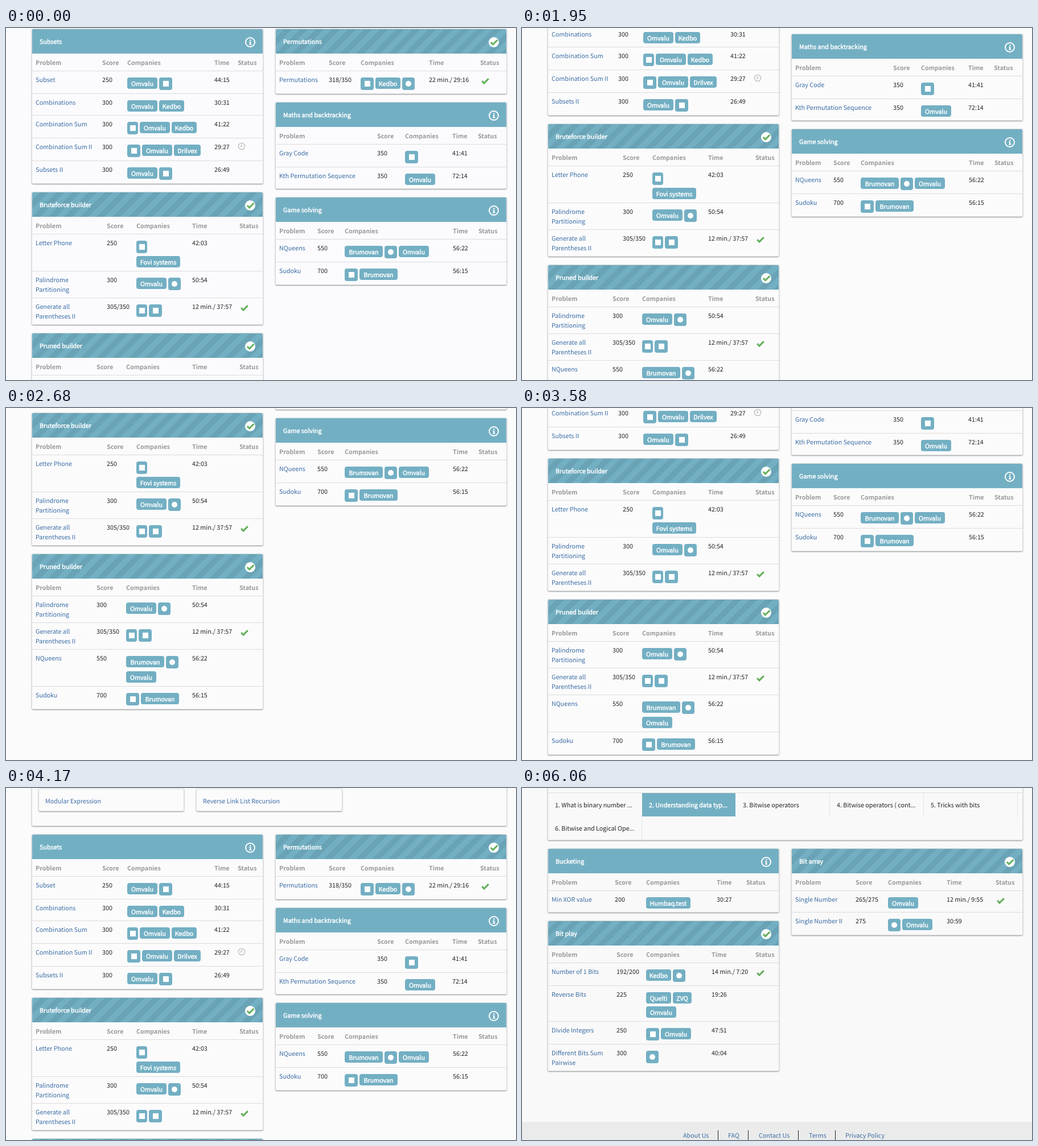
An HTML page that plays this animation: 896x619 px, repeating every 8 s.

```html
<!DOCTYPE html>
<html lang="en">
<head>
<meta charset="utf-8">
<title>Practice problems</title>
<style>
html, body { margin: 0; width: 100%; height: 100%; overflow: hidden; }
body {
  position: relative;
  font: 10.74px/17px "Noto Sans CJK JP", "Noto Sans CJK SC", "Noto Sans CJK KR", "Noto Sans CJK TC", "Open Sans", sans-serif;
  text-rendering: geometricPrecision;
  color: #222;
  animation: tint 8s step-end infinite;
}
div, svg { position: absolute; }
.page { left: 0; top: 0; width: 896px; height: 619px; }
#list { animation: scroll 8s step-end infinite; }
#bits { visibility: hidden; animation: swap 8s step-end infinite; }
.t { white-space: pre; }
.link { color: #3a6ca3; }
.th { font-weight: 700; color: #999; }
.heavy { color: #fff; -webkit-text-stroke: .45px #fff; }
.card { border-radius: 3px; box-shadow: inset 0 0 0 1px #dcdcdc, 0 1px 2px rgba(0,0,0,.4); }
.head { height: 43px; border-radius: 2px 2px 0 0; background: #73afc3; }
.done { background: repeating-linear-gradient(135deg, #73afc3 0 10px, #69a3b5 10px 20px); }
.line { height: 1px; background: #dcdcdc; }
.rule { width: 1px; background: #e4e4e4; }
.badge { height: 20px; line-height: 23px; border-radius: 4px; background: #73afc3; text-align: center; white-space: pre; }
.icon { height: 22px; }
.icon::after {
  content: ""; position: absolute; left: 50%; top: 50%;
  width: 10px; height: 10px; margin: -5px; background: #fff;
}
.round::after { border-radius: 50%; }
@keyframes scroll {
  0% { transform: translateY(0); }
  18.75% { transform: translateY(-40px); }
  22.5% { transform: translateY(-80px); }
  24.375% { transform: translateY(-120px); }
  26.25% { transform: translateY(-155px); }
  28% { transform: translateY(-187px); }
  29.875% { transform: translateY(-200px); }
  31.625% { transform: translateY(-240px); }
  33.5% { transform: translateY(-280px); }
  39.125% { transform: translateY(-240px); }
  44.75% { transform: translateY(-200px); }
  46.625% { transform: translateY(-130px); }
  48.5% { transform: translateY(-59px); }
  50.375% { transform: translateY(0); }
  52.125% { transform: translateY(80px); }
  57.625% { transform: translateY(120px); visibility: visible; }
  75.75%, 100% { transform: translateY(120px); visibility: hidden; }
}
@keyframes swap {
  0% { visibility: hidden; }
  75.75%, 100% { visibility: visible; }
}
@keyframes tint {
  0% { background: #fbfbfe; }
  18.75% { background: #fbfbfc; }
  57.625% { background: #fcfdfd; }
  75.75%, 100% { background: #f9f9f9; }
}
</style>
</head>
<body>
<div class="page" id="list"></div>
<div class="page" id="bits"></div>
<script>
// badge code: [label, width]
const firms = {
  a: ['Omvalu', 53], d: ['Kedbo', 44], i: ['Drilvex', 47], e: ['Fovi systems', 77],
  q: ['Brumovan', 67], b: ['Humbaq.test', 78], n: ['Quelti', 44], h: ['ZVQ', 33]
};
// icon code: [width, shape]
const icons = { w: [23, ''], f: [19, ''], g: [22, 'round'], y: [22, 'round'] };

const INFO = 'M8 4.6h2.6v2H8zM7.2 7.8h3.2v4.2h1v1.5H7.1V12h1V9.3h-.9z';
const tickPath = '<path d="M1.2 6.2 5 10 12.8 2.2" fill="none" stroke="#66b05c" stroke-width="3.1"/>';
const headIcon = {
  info: `<circle cx="9" cy="9" r="8" fill="none" stroke="#fff" stroke-width="2"/><path d="${INFO}" fill="#fff"/>`,
  done: `<circle cx="9" cy="9" r="9" fill="#fff"/><g transform="translate(2.6 2.8)">${tickPath}</g>`
};
const clock = '<g fill="none" stroke="#bbb" stroke-width="1.3"><circle cx="7" cy="7" r="5.7"/><path d="M7 3.6V7.4H4.6"/></g>';
const CARD_W = 407;

let page;

function box(cls, x, y, w, h) {
  const el = document.createElement('div');
  el.className = cls;
  el.style.cssText = `left:${x}px;top:${y}px`;
  if (w) el.style.width = w + 'px';
  if (h) el.style.height = h + 'px';
  page.append(el);
  return el;
}

function text(cls, x, y, str) {
  box('t ' + cls, x, y).textContent = str;
}

function svg(x, y, size, body) {
  page.insertAdjacentHTML('beforeend',
    `<svg style="left:${x}px;top:${y}px" width="${size}" height="${size}" overflow="visible">${body}</svg>`);
}

function badges(x, y, codes) {
  for (const group of codes.split('/')) {
    let left = x, step = 25;
    for (const c of group) {
      const icon = icons[c];
      const w = icon ? icon[0] : firms[c][1];
      if (icon) {
        box('badge icon ' + icon[1], left, y, w);
        step = 27;
      } else {
        box('badge heavy', left, y, w).textContent = firms[c][0];
      }
      left += w + 3;
    }
    y += step;
  }
}

// row: [height, problem, score, badge codes, time, status]
function card(x, y, title, state, cols, rows) {
  const total = rows.reduce((sum, r) => sum + r[0], 75);
  box('card', x, y, CARD_W, total);
  box('head ' + state, x + 1, y + 1, CARD_W - 2);
  text('heavy', x + 14, y + 15, title);
  svg(x + 374.5, y + 14.5, 18, headIcon[state]);
  ['Problem', 'Score', 'Companies', 'Time', 'Status'].forEach((s, i) => text('th', cols[i], y + 52, s));
  let top = y + 74;
  for (const [h, name, score, codes, time, status] of rows) {
    box('line', x + 1, top, CARD_W - 2);
    text('link', cols[0], top + 8, name);
    text('', cols[1], top + 8, score);
    badges(cols[2], top + 12, codes);
    text('', cols[3], top + 8, time);
    if (status === 'tick') svg(cols[4] + 2, top + 11.5, 14, tickPath);
    if (status === 'clock') svg(cols[4], top + 8, 14, clock);
    top += h;
  }
}

// problem list
page = document.getElementById('list');
box('card', 45, -260, 835, 247);
text('', 60, -119, 'Examples');
page.lastChild.style.color = '#47614f';
box('line', 46, -90, 833).style.background = '#e3e6d3';
svg(851.5, -120, 13, `<circle cx="6.5" cy="6.5" r="6.3" fill="#5aa9d6"/><path transform="translate(-.3 0) scale(.74)" d="${INFO}" fill="#fff"/>`);
box('card', 57, -79, 256, 40);
box('card', 334, -79, 257, 40);
text('link', 69, -65, 'Modular Expression');
text('link', 346, -65, 'Reverse Link List Recursion');

card(45, 1, 'Subsets', 'info', [52, 169, 213, 366, 407], [
  [40, 'Subset', 250, 'aw', '44:15'],
  [38, 'Combinations', 300, 'ad', '30:31'],
  [40, 'Combination Sum', 300, 'fad', '41:22'],
  [40, 'Combination Sum II', 300, 'wai', '29:27', 'clock'],
  [40, 'Subsets II', 300, 'aw', '26:49']
]);
card(45, 288, 'Bruteforce builder', 'done', [52, 177, 229, 327, 410], [
  [65, 'Letter Phone', 250, 'f/e', '42:03'],
  [47, 'Palindrome\nPartitioning', 300, 'ag', '50:54'],
  [47, 'Generate all\nParentheses II', '305/350', 'fw', '12 min./ 37:57', 'tick']
]);
card(45, 536, 'Pruned builder', 'done', [52, 159, 211, 327, 410], [
  [47, 'Palindrome\nPartitioning', 300, 'ag', '50:54'],
  [47, 'Generate all\nParentheses II', '305/350', 'fw', '12 min./ 37:57', 'tick'],
  [65, 'NQueens', 550, 'qg/a', '56:22'],
  [40, 'Sudoku', 700, 'wq', '56:15']
]);
card(473, 1, 'Permutations', 'done', [480, 567, 623, 743, 833], [
  [40, 'Permutations', '318/350', 'wdg', '22 min./ 29:16', 'tick']
]);
card(473, 130, 'Maths and backtracking', 'info', [480, 652, 701, 784, 829], [
  [40, 'Gray Code', 350, 'w', '41:41'],
  [38, 'Kth Permutation Sequence', 350, 'a', '72:14']
]);
card(473, 297, 'Game solving', 'info', [480, 547, 595, 785, 830], [
  [40, 'NQueens', 550, 'qga', '56:22'],
  [40, 'Sudoku', 700, 'wq', '56:15']
]);

// bit manipulation page
page = document.getElementById('bits');
box('card', 45, -60, 835, 152);
box('line', 46, 8, 833);
box('', 211, 9, 164, 41).style.background = '#73afc3';
for (const x of [540, 705, 870]) box('rule', x, 9, 1, 41);
box('rule', 210, 50, 1, 41);
['1. What is binary number ...', '2. Understanding data typ...', '3. Bitwise operators',
 '4. Bitwise operators ( cont...', '5. Tricks with bits', '6. Bitwise and Logical Ope...']
  .forEach((s, i) => text(i === 1 ? 'heavy' : '', 58 + i % 5 * 165, i < 5 ? 22 : 63, s));

card(45, 106, 'Bucketing', 'info', [52, 163, 218, 342, 394], [
  [38, 'Min XOR value', 200, 'b', '30:27']
]);
card(45, 233, 'Bit play', 'done', [52, 166, 218, 333, 410], [
  [40, 'Number of 1 Bits', '192/200', 'dy', '14 min./ 7:20', 'tick'],
  [63, 'Reverse Bits', 225, 'nh/a', '19:26'],
  [40, 'Divide Integers', 250, 'wa', '47:51'],
  [47, 'Different Bits Sum\nPairwise', 300, 'g', '40:04']
]);
card(473, 106, 'Bit array', 'done', [480, 586, 643, 746, 832], [
  [38, 'Single Number', '265/275', 'a', '12 min./ 9:55', 'tick'],
  [40, 'Single Number II', 275, 'ga', '30:59']
]);

box('', 0, 587, 896, 32).style.background = '#ebebeb';
[[283, 'About Us'], [362, 'FAQ'], [416, 'Contact Us'], [504, 'Terms'], [568, 'Privacy Policy']]
  .forEach(([x, s]) => text('link', x, 603, s));
for (const x of [344, 397, 485, 550]) box('rule', x, 602, 1, 17).style.background = '#222';
</script>
</body>
</html>
```
